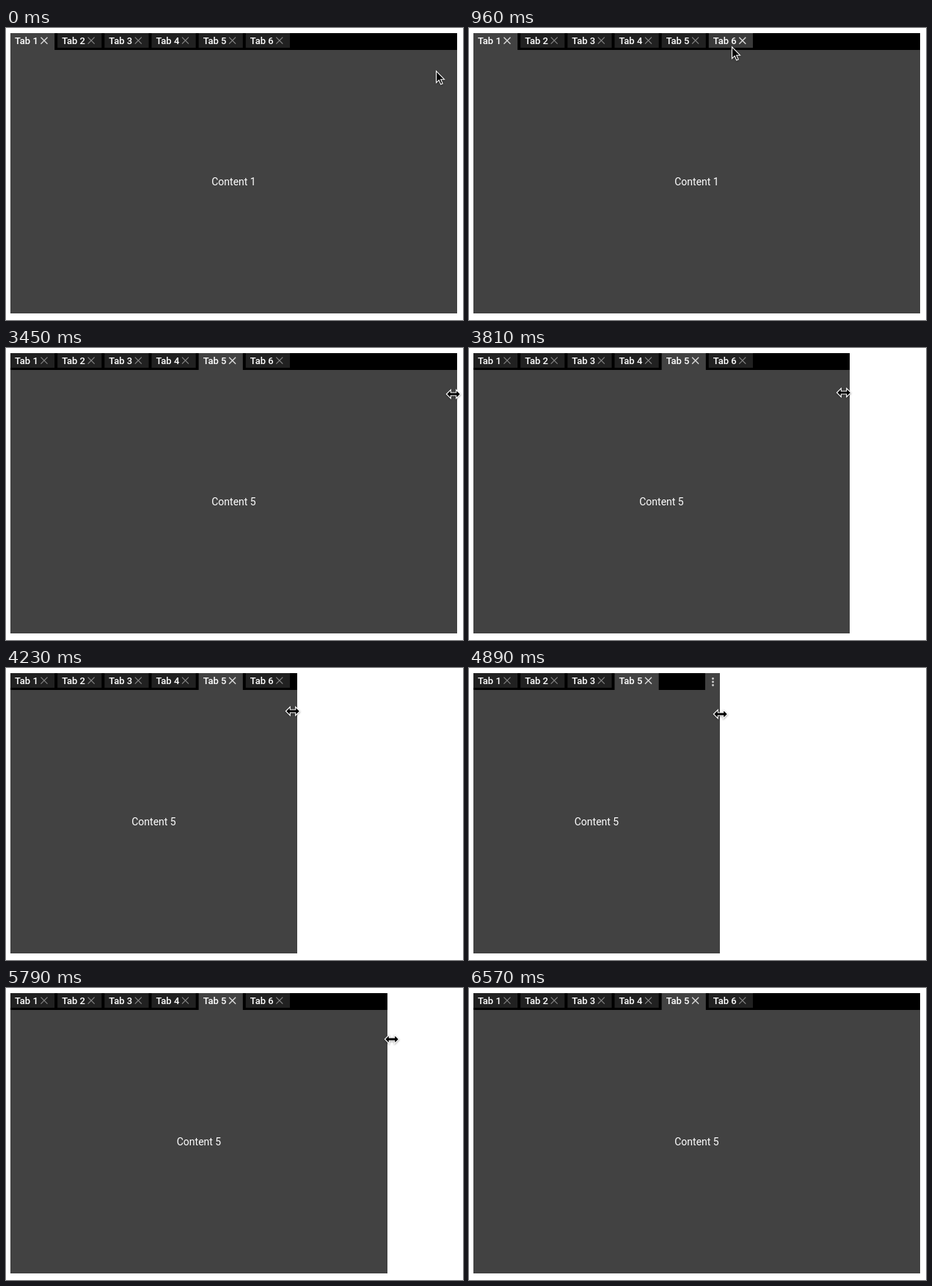
Write an HTML page that moves like this. It is 623 px wide and 399 px high and loops after 7620 ms.

```html
<!DOCTYPE html>
<html lang="en">
<head>
<meta charset="utf-8">
<title>Tab overflow</title>
<style>
  html, body { margin: 0; width: 100%; height: 100%; overflow: hidden; background: #fff; }
  svg { display: block; width: 623px; height: 399px; }
  text { font-family: Roboto, Arial, sans-serif; fill: #fff; }
  .tab text { font-size: 13px; font-weight: 500; }
  .tab rect { fill: #212121; }
  .tab path { stroke: #858585; stroke-width: 1.2; fill: none; }
  .tab.hover rect { fill: #3a3a3a; }
  .tab.active rect { fill: #424242; height: 23px; }
  .tab.active.hover rect { fill: #4a4a4a; }
  .tab.active path, .tab.hover path { stroke: #d8d8d8; stroke-width: 1.4; }
  #label { font-size: 14px; text-anchor: middle; }
  #more circle { fill: #d0d0d0; }
  .cursor { fill: #000; stroke: #fff; stroke-width: 1.1; stroke-linejoin: miter;
    filter: drop-shadow(0 1px 1px rgba(0, 0, 0, .35)); }
</style>
</head>
<body>
<svg viewBox="0 0 623 399">
  <rect id="body" x="6" y="7" height="383" fill="#424242"/>
  <rect id="bar" x="6" y="7" height="23" fill="#000"/>
  <g id="tabs"></g>
  <g id="more">
    <rect x="-20" y="7" width="20" height="23" fill="#424242"/>
    <circle cx="-9.5" cy="14.5" r="1.4"/>
    <circle cx="-9.5" cy="19" r="1.4"/>
    <circle cx="-9.5" cy="23.5" r="1.4"/>
  </g>
  <text id="label" y="215"></text>
  <path id="arrow" class="cursor" d="M.5 .8V16.7L4.2 13.2L6.7 19L9.2 17.9L6.7 12.2H11.5Z"/>
  <path id="resize" class="cursor"
    d="M-9.6 0L-3.7 -6V-2H3.7V-6L9.6 0L3.7 6V2H-3.7V6Z"/>
</svg>
<script>
const LOOP = 7620, STEP = 30, LEFT = 6, RIGHT = 615;
const PITCH = 64.16, TAB_W = 60.2, TAB_COUNT = 6, MENU_W = 20;
const CLICK = 1800, GRAB = 3420, EDGE_X = 611;

// Pointer stops: time, x, y
const stops = [
  [0, 586, 58], [780, 386, 32], [1140, 345, 20], [1380, 345, 20],
  [1770, 286, 20], [2100, 286, 20], [2760, 579, 67], [3120, 616, 62],
  [GRAB, 616, 62], [3450, 610, 63], [4200, 398, 59], [4230, 391, 59],
  [4860, 343, 63], [5220, 343, 63], [5760, 521, 69.5], [5790, 526, 70],
  [6000, 574, 68], [6540, 637, 66], [LOOP, 637, 66]
];

const $ = id => document.getElementById(id);
const rate = (i, k) => (stops[i + 1][k] - stops[i][k]) / (stops[i + 1][0] - stops[i][0]);

// Harmonic mean keeps the curve free of overshoot
function slope(i, k) {
  if (i === 0 || i === stops.length - 1) return 0;
  const a = rate(i - 1, k), b = rate(i, k);
  return a * b > 0 ? 2 * a * b / (a + b) : 0;
}

function pointer(t) {
  let i = 0;
  while (i < stops.length - 2 && stops[i + 1][0] <= t) i++;
  const p = stops[i], q = stops[i + 1], d = q[0] - p[0];
  const u = (t - p[0]) / d, v = 1 - u;
  return [1, 2].map(k =>
    p[k] * (1 + 2 * u) * v * v + q[k] * (3 - 2 * u) * u * u +
    d * u * v * (slope(i, k) * v - slope(i + 1, k) * u));
}

// The panel follows the pointer one step late
function panelEdge(t) {
  if (t < GRAB + STEP) return RIGHT;
  return Math.min(RIGHT, Math.round(pointer(t - STEP)[0] - 1));
}

function visibleTabs(edge, active) {
  const all = Array.from({ length: TAB_COUNT }, (_, i) => i + 1);
  const fit = w => Math.floor((w - LEFT + 0.5) / PITCH);
  if (fit(edge) >= TAB_COUNT) return all;
  const room = fit(edge - MENU_W);
  const shown = all.slice(0, room);
  if (!shown.includes(active)) shown[room - 1] = active;
  return shown;
}

for (let n = 1; n <= TAB_COUNT; n++) {
  $('tabs').insertAdjacentHTML('beforeend',
    `<g class="tab"><rect y="7" width="${TAB_W}" height="20"/>` +
    `<text x="6" y="22">Tab ${n}</text><path d="M41.5 12.7l9 9m0-9l-9 9"/></g>`);
}
const tabs = [...$('tabs').children];

function place(el, x, y, shown) {
  el.setAttribute('transform', `translate(${x} ${y})`);
  el.style.display = shown ? '' : 'none';
}

function draw(t) {
  const [x, y] = pointer(t);
  const edge = panelEdge(t);
  const active = t < CLICK ? 1 : 5;
  const shown = visibleTabs(edge, active);
  const resizing = t >= GRAB || x >= EDGE_X;

  $('body').setAttribute('width', edge - LEFT);
  $('bar').setAttribute('width', edge - LEFT);
  tabs.forEach((tab, i) => {
    const slot = shown.indexOf(i + 1), left = LEFT + slot * PITCH;
    const hover = !resizing && y < 29 && x >= left && x < left + TAB_W;
    place(tab, left, 0, slot >= 0);
    tab.classList.toggle('active', i + 1 === active);
    tab.classList.toggle('hover', hover);
  });
  place($('more'), edge, 0, shown.length < TAB_COUNT);
  $('label').setAttribute('x', (LEFT + edge) / 2);
  $('label').textContent = 'Content ' + active;
  place($('arrow'), Math.round(x), Math.round(y), !resizing);
  place($('resize'), Math.round(x), Math.round(y), resizing && x < 636);
}

const start = performance.now();
function tick() {
  const t = (performance.now() - start) % LOOP;
  draw(Math.floor(t / STEP) * STEP);
  requestAnimationFrame(tick);
}
tick();
</script>
</body>
</html>
```
